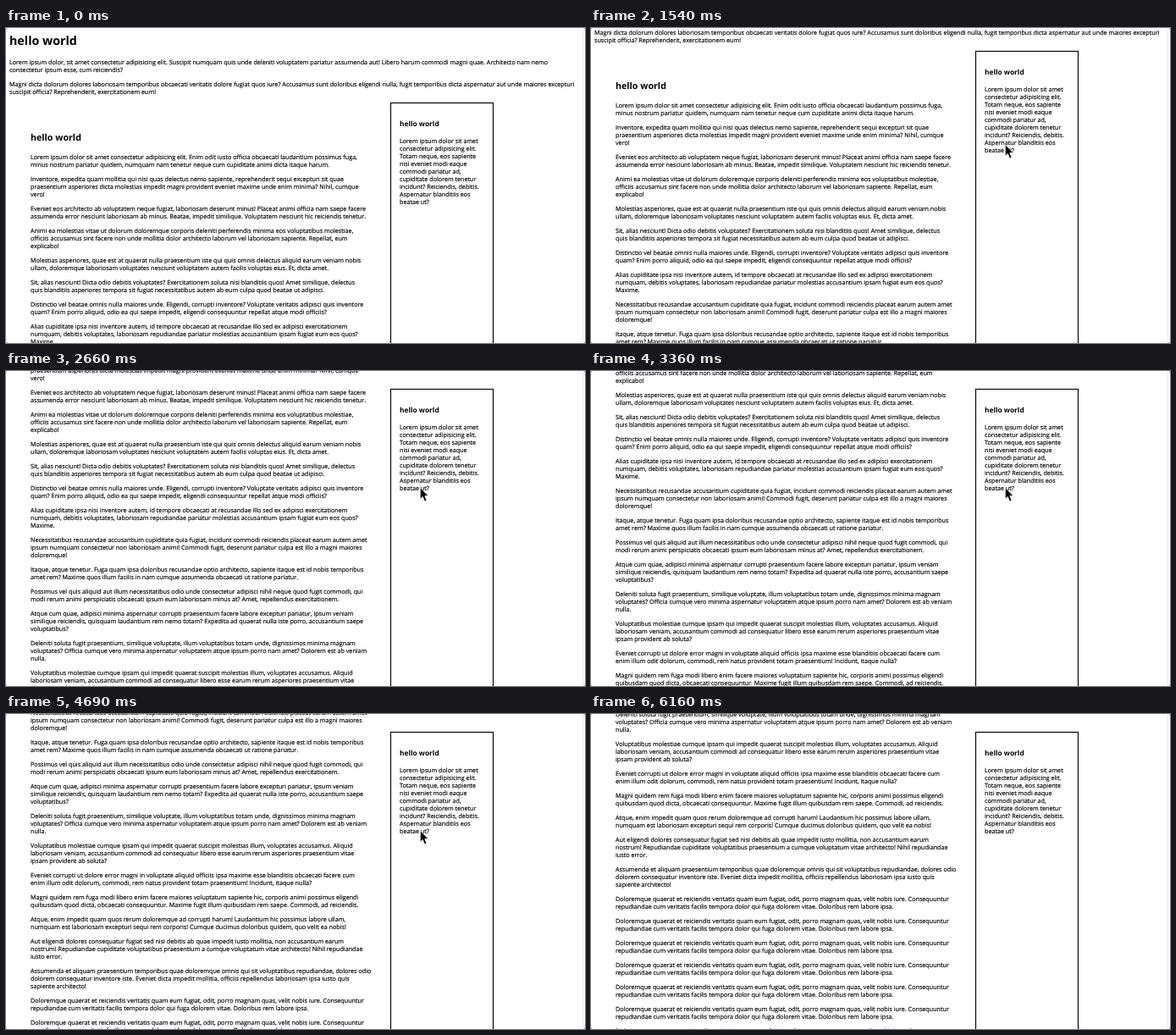
An HTML page that plays this animation: 684 by 372 pixels, repeating every 7700 ms.

```html
<!DOCTYPE html>
<html lang="la">
<head>
<meta charset="utf-8">
<title>Sticky sidebar</title>
<style>
html, body { margin: 0; width: 684px; height: 372px; overflow: hidden; background: #777; }
svg { display: block; background: #fff; border-radius: 2px; }
text { font: 7.19px "Open Sans", "Noto Sans", sans-serif; text-rendering: geometricPrecision; white-space: pre; stroke: #000; stroke-width: .16px; }
.title { font-weight: 700; stroke: none; }
</style>
</head>
<body>
<svg id="stage" width="684" height="372" viewBox="0 0 684 372">
  <path d="M681.5 0V372" stroke="#e6e6e6"/>
  <g id="page"></g>
  <g id="side"><rect x="454.5" y="88.5" width="121" height="900" fill="none" stroke="#000" stroke-width="1.15"/></g>
  <path id="cursor" d="M489.3 137.6V151.2L492.3 148.4L494.5 153.9L497 152.9L494.8 147.6H499Z" stroke="#fff" stroke-width=".8"/>
</svg>
<script>
const LOOP = 7700, STEP = 70, NOTCH = 47.5, GLIDE = 280, MAX = 509;
const LINE = 9, GAP = 8;

const intro = `Lorem ipsum dolor, sit amet consectetur adipisicing elit. Suscipit numquam quis unde deleniti voluptatem pariatur assumenda aut! Libero harum commodi magni quae. Architecto nam nemo
consectetur ipsum esse, cum reiciendis?

Magni dicta dolorum dolores laboriosam temporibus obcaecati veritatis dolore fugiat quos iure? Accusamus sunt doloribus eligendi nulla, fugit temporibus dicta aspernatur aut unde maiores excepturi
suscipit officia? Reprehenderit, exercitationem eum!`;

const article = `Lorem ipsum dolor sit amet consectetur adipisicing elit. Enim odit iusto officia obcaecati laudantium possimus fuga,
minus nostrum pariatur quidem, numquam nam tenetur neque cum cupiditate animi dicta itaque harum.

Inventore, expedita quam mollitia qui nisi quas delectus nemo sapiente, reprehenderit sequi excepturi sit quae
praesentium asperiores dicta molestias impedit magni provident eveniet maxime unde enim minima? Nihil, cumque
vero!

Eveniet eos architecto ab voluptatem neque fugiat, laboriosam deserunt minus! Placeat animi officia nam saepe facere
assumenda error nesciunt laboriosam ab minus. Beatae, impedit similique. Voluptatem nesciunt hic reiciendis tenetur.

Animi ea molestias vitae ut dolorum doloremque corporis deleniti perferendis minima eos voluptatibus molestiae,
officiis accusamus sint facere non unde mollitia dolor architecto laborum vel laboriosam sapiente. Repellat, eum
explicabo!

Molestias asperiores, quae est at quaerat nulla praesentium iste qui quis omnis delectus aliquid earum veniam nobis
ullam, doloremque laboriosam voluptates nesciunt voluptatem autem facilis voluptas eius. Et, dicta amet.

Sit, alias nesciunt! Dicta odio debitis voluptates? Exercitationem soluta nisi blanditiis quos! Amet similique, delectus
quis blanditiis asperiores tempora sit fugiat necessitatibus autem ab eum culpa quod beatae ut adipisci.

Distinctio vel beatae omnis nulla maiores unde. Eligendi, corrupti inventore? Voluptate veritatis adipisci quis inventore
quam? Enim porro aliquid, odio ea qui saepe impedit, eligendi consequuntur repellat atque modi officiis?

Alias cupiditate ipsa nisi inventore autem, id tempore obcaecati at recusandae illo sed ex adipisci exercitationem
numquam, debitis voluptates, laboriosam repudiandae pariatur molestias accusantium ipsam fugiat eum eos quos?
Maxime.

Necessitatibus recusandae accusantium cupiditate quia fugiat, incidunt commodi reiciendis placeat earum autem amet
ipsum numquam consectetur non laboriosam animi! Commodi fugit, deserunt pariatur culpa est illo a magni maiores
doloremque!

Itaque, atque tenetur. Fuga quam ipsa doloribus recusandae optio architecto, sapiente itaque est id nobis temporibus
amet rem? Maxime quos illum facilis in nam cumque assumenda obcaecati ut ratione pariatur.

Possimus vel quis aliquid aut illum necessitatibus odio unde consectetur adipisci nihil neque quod fugit commodi, qui
modi rerum animi perspiciatis obcaecati ipsum eum laboriosam minus at? Amet, repellendus exercitationem.

Atque cum quae, adipisci minima aspernatur corrupti praesentium facere labore excepturi pariatur, ipsum veniam
similique reiciendis, quisquam laudantium rem nemo totam? Expedita ad quaerat nulla iste porro, accusantium saepe
voluptatibus?

Deleniti soluta fugit praesentium, similique voluptate, illum voluptatibus totam unde, dignissimos minima magnam
voluptates? Officia cumque vero minima aspernatur voluptatem atque ipsum porro nam amet? Dolorem est ab veniam
nulla.

Voluptatibus molestiae cumque ipsam qui impedit quaerat suscipit molestias illum, voluptates accusamus. Aliquid
laboriosam veniam, accusantium commodi ad consequatur libero esse earum rerum asperiores praesentium vitae
ipsam provident ab soluta?

Eveniet corrupti ut dolore error magni in voluptate aliquid officiis ipsa maxime esse blanditiis obcaecati facere cum
enim illum odit dolorum, commodi, rem natus provident totam praesentium! Incidunt, itaque nulla?

Magni quidem rem fuga modi libero enim facere maiores voluptatum sapiente hic, corporis animi possimus eligendi
quibusdam quod dicta, obcaecati consequuntur. Maxime fugit illum quibusdam rem saepe. Commodi, ad reiciendis.

Atque, enim impedit quam quos rerum doloremque ad corrupti harum! Laudantium hic possimus labore ullam,
numquam est laboriosam excepturi sequi rem corporis! Cumque ducimus doloribus quidem, quo velit ea nobis!

Aut eligendi dolores consequatur fugiat sed nisi debitis ab quae impedit iusto mollitia, non accusantium earum
nostrum! Repudiandae cupiditate voluptatibus praesentium a cumque voluptatum vitae architecto! Nihil repudiandae
iusto error.

Assumenda et aliquam praesentium temporibus quae doloremque omnis qui sit voluptatibus repudiandae, dolores odio
dolorem consequatur inventore iste. Eveniet dicta impedit mollitia, officiis repellendus laboriosam ipsa iusto quis
sapiente architecto!` + `

Doloremque quaerat et reiciendis veritatis quam eum fugiat, odit, porro magnam quas, velit nobis iure. Consequuntur
repudiandae cum veritatis facilis tempora dolor qui fuga dolorem vitae. Doloribus rem labore ipsa.`.repeat(8);

const aside = `Lorem ipsum dolor sit amet
consectetur adipisicing elit.
Totam neque, eos sapiente
nisi eveniet modi eaque
commodi pariatur ad,
cupiditate dolorem tenetur
incidunt? Reiciendis, debitis.
Aspernatur blanditiis eos
beatae ut?`;

const $ = id => document.getElementById(id);

function addText(group, x, y, str, size) {
  const el = document.createElementNS("http://www.w3.org/2000/svg", "text");
  el.setAttribute("x", x);
  el.setAttribute("y", y);
  el.textContent = str;
  if (size) {
    el.classList.add("title");
    el.style.fontSize = size + "px";
  }
  group.append(el);
}

function addCopy(group, x, y, copy) {
  for (const para of copy.split("\n\n")) {
    for (const line of para.split("\n")) {
      addText(group, x, y, line);
      y += LINE;
    }
    y += GAP;
  }
}

const page = $("page"), side = $("side");
addText(page, 4, 20, "hello world", 14.26);
addCopy(page, 4, 43, intro);
addText(page, 29, 133.4, "hello world", 10.7);
addCopy(page, 29, 155, article);
addText(side, 465, 116, "hello world", 8.34);
addCopy(side, 465, 135.6, aside);

// Wheel notches: [first visible step, ms of glide already elapsed]
const notches = [
  [980, 102], [1470, 30], [1960, 24], [2450, 30], [2940, 80], [3360, 78],
  [3850, 80], [4200, 32], [4690, 80], [5110, 173], [5530, 110]
];

const ease = u => (1 - Math.cos(Math.PI * Math.min(u, 1))) / 2;

function scrollAt(t) {
  let y = 0;
  for (const [start, lead] of notches)
    if (t >= start) y += NOTCH * ease((t - start + lead) / GLIDE);
  return Math.min(MAX, Math.round(y));
}

function draw(now) {
  const t = Math.floor(now % LOOP / STEP) * STEP;
  const y = scrollAt(t);
  page.setAttribute("transform", `translate(0 ${-y})`);
  side.setAttribute("transform", `translate(0 ${-Math.min(y, 67)})`);
  $("cursor").style.display = t >= 1470 && t < 6160 ? "" : "none";
}

const origin = performance.now();
function tick() {
  draw(performance.now() - origin);
  requestAnimationFrame(tick);
}
tick();
</script>
</body>
</html>
```
